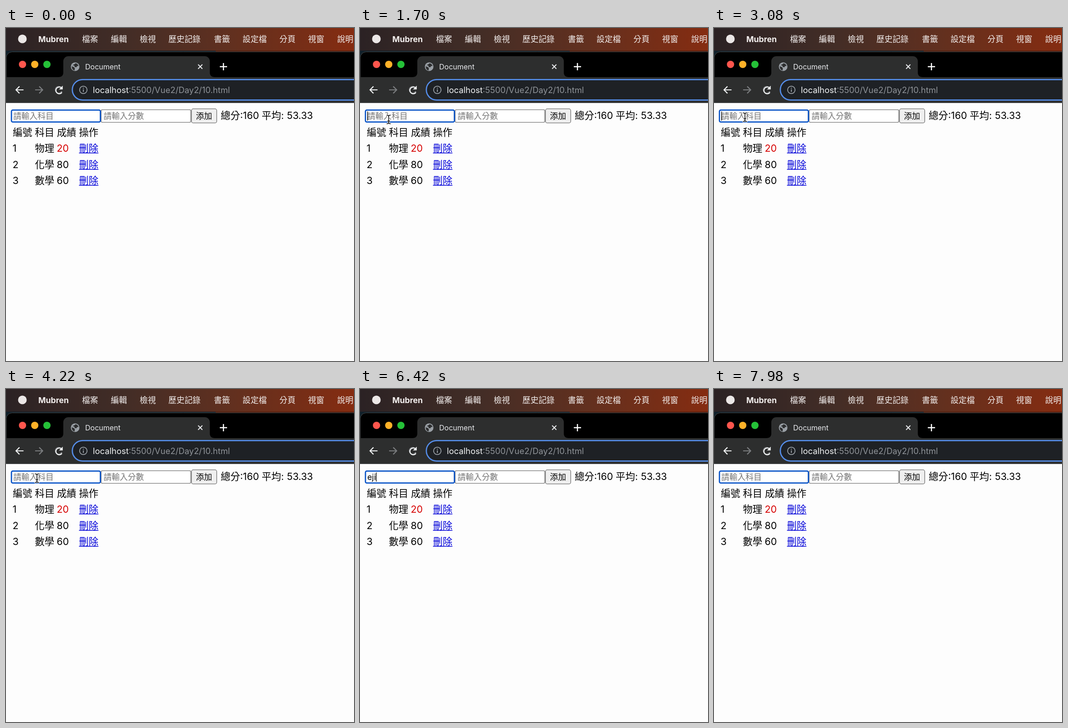
Write an HTML page with a canvas that moves like this. It is 765 px wide and 732 px high and loops after 8000 ms.

```html
<!DOCTYPE html>
<html lang="zh-Hant">
<head>
<meta charset="utf-8">
<title>Document</title>
<style>
  html, body { margin: 0; width: 100%; height: 100%; overflow: hidden; background: #fdfdfd; }
  canvas { display: block; width: 765px; height: 732px; }
</style>
</head>
<body>
<canvas id="stage"></canvas>
<script>
const W = 765, H = 732, LOOP = 8000, BLINK = 600;
const canvas = document.getElementById('stage');
const ctx = canvas.getContext('2d');
const dpr = window.devicePixelRatio || 1;
canvas.width = W * dpr;
canvas.height = H * dpr;

const FAMILY = 'Inter, "Noto Sans CJK TC", "Noto Sans CJK", sans-serif';
const PAGE = 21.33, FORM = 17.78;

// [time, field content]
const keys = [[0, ''], [5400, 'e'], [6000, 'ej'], [6250, 'eji'],
              [7000, 'ej'], [7170, 'e'], [7340, '']];
// moments at which the caret becomes solid again
const resets = [-600, 1560, 1850, ...keys.slice(1).map(k => k[0])];
// pointer path: [time, x, y]
const path = [[60, 420, 648], [820, 66, 235], [1500, 63, 201], [1750, 63, 201], [2350, 68, 196]];

function text(str, x, y, size, color, weight = 400) {
  ctx.font = `${weight} ${size}px ${FAMILY}`;
  ctx.fillStyle = color;
  ctx.fillText(str, x, y);
  return ctx.measureText(str).width;
}

function rect(x, y, w, h, color) {
  ctx.fillStyle = color;
  ctx.fillRect(x, y, w, h);
}

function box(x, y, w, h, r, fill, stroke, lw) {
  ctx.beginPath();
  ctx.roundRect(x, y, w, h, r);
  ctx.fillStyle = fill;
  ctx.fill();
  if (!stroke) return;
  ctx.strokeStyle = stroke;
  ctx.lineWidth = lw;
  ctx.stroke();
}

function disc(x, y, r, color) {
  ctx.beginPath();
  ctx.arc(x, y, r, 0, 7);
  ctx.fillStyle = color;
  ctx.fill();
}

function stroke(d, color, lw) {
  ctx.strokeStyle = color;
  ctx.lineWidth = lw;
  ctx.stroke(new Path2D(d));
}

function menuBar() {
  const g = ctx.createLinearGradient(0, 0, W, 0);
  g.addColorStop(0, '#2b2224');
  g.addColorStop(0.35, '#432d26');
  g.addColorStop(0.65, '#62301f');
  g.addColorStop(1, '#852c11');
  rect(0, 0, W, 53, g);
  rect(0, 50, 461, 18, '#10202a');
  rect(461, 50, W - 461, 3, '#4c1d0f');
  disc(36, 24, 9.5, '#ebe7e6');
  text('Mubren', 71, 31, 17.7, '#f4f0ef', 700);
  const items = [['檔案', 167], ['編輯', 230.5], ['檢視', 294], ['歷史記錄', 357], ['書籤', 457],
                 ['設定檔', 520], ['分頁', 601], ['視窗', 664], ['說明', 728]];
  for (const [label, x] of items) text(label, x, 31, 17.7, '#f4f0ef', 500);
}

function globe(x, y) {
  disc(x, y, 9.5, '#9aa0a6');
  ctx.fillStyle = '#2d2e2f';
  ctx.fill(new Path2D(`M${x - 7.5} ${y - 1}l5 2 2 3 -1 4.500q-6 -1.500 -6 -9.500z
    M${x + 1} ${y - 7.5}q5 1 6.500 6l-3 0 -2 3 -3.500 -1 -1 -3 -4 -1q4 -1 7 -4z`));
}

function browser() {
  box(0.5, 52.5, W + 20, 125, 13, '#000', '#4a4d4f', 1);
  rect(0, 108, W, 57, '#2d2e2e');
  box(126, 62, 322, 48, [11, 11, 0, 0], '#2d2e2e');
  ctx.fillStyle = '#2d2e2e';
  ctx.fill(new Path2D('M115 108q11 0 11 -11v11z M459 108q-11 0 -11 -11v11z'));
  rect(0, 164, W, 1.3, '#55585a');

  disc(36.3, 80, 8, '#ff564d');
  disc(63.2, 80, 8, '#ffb128');
  disc(90, 80, 8, '#25c138');

  globe(152, 85);
  text('Document', 174, 90.500, 16, '#e8eaed');
  stroke('M422.300 80.300l9.400 9.400M431.700 80.300l-9.400 9.400', '#e8eaed', 2);
  stroke('M470 85h16M478 77v16', '#fff', 2.5);

  const arrow = 'l-7.600 7.600 7.600 7.600';
  stroke(`M29.600 128.400${arrow}M22.500 136H38.500`, '#f1f3f4', 2.2);
  stroke('M73 128.400l7.600 7.600 -7.600 7.600M64 136H80', '#7c7e80', 2.2);
  ctx.beginPath();
  ctx.arc(115.8, 136, 7.4, 0.35, 5.6);
  ctx.stroke();
  stroke('M123 141.500A7.400 7.400 0 1 1 121.500 131.200', '#f1f3f4', 2.3);
  ctx.fillStyle = '#f1f3f4';
  ctx.fill(new Path2D('M124.700 126.800v8.200h-8.200z'));

  box(145.8, 113.3, W, 45, 22.5, '#1e2125', '#558de8', 2.7);
  ctx.beginPath();
  ctx.arc(170, 136, 8.2, 0, 7);
  ctx.strokeStyle = '#9aa0a6';
  ctx.lineWidth = 1.8;
  ctx.stroke();
  rect(169.1, 135, 1.9, 5.5, '#9aa0a6');
  rect(169.1, 131.3, 1.9, 2, '#9aa0a6');
  const w = text('localhost', 191, 142.5, 18.45, '#f1f3f4');
  text(':5500/Vue2/Day2/10.html', 191 + w, 142.5, 18.45, '#8f9398');
}

function page(value, caret) {
  rect(0, 165, W, H - 165, '#fdfdfd');

  box(209.2, 179.7, 197, 27.6, 2.5, '#fff', '#747474', 1.3);
  box(12, 180.3, 195.5, 26.4, 3, '#fff', '#0b55c8', 2.8);
  let x = 16;
  if (value) x += text(value, 16, 200, FORM, '#000');
  else text('請輸入科目', 16, 200, FORM, '#757575');
  if (caret) rect(x, 183.5, 1.4, 20, '#000');
  text('請輸入分數', 214.5, 200, FORM, '#757575');

  box(407.7, 177.7, 55.6, 31, 4, '#efefef', '#6f6f6f', 1.3);
  text('添加', 417.5, 200, FORM, '#000');
  text('總分:160', 472, 199.5, PAGE, '#000');
  text('平均:', 562, 199.5, PAGE, '#000');
  text('53.33', 617.5, 199.5, PAGE, '#000');

  const cols = [15, 63.5, 112, 160.5];
  ['編號', '科目', '成績', '操作'].forEach((s, i) => text(s, cols[i], 237, PAGE, '#000'));
  [['物理', 20], ['化學', 80], ['數學', 60]].forEach(([name, score], i) => {
    const y = 272 + i * 35.6;
    text(String(i + 1), cols[0] - 0.5, y, PAGE, '#000');
    text(name, cols[1], y, PAGE, '#000');
    text(String(score), cols[2] - 0.5, y, PAGE, score < 60 ? '#d60000' : '#000');
    text('刪除', cols[3], y, PAGE, '#0000d8');
    rect(cols[3], Math.round(y + 2), 42.7, 1.5, '#0000d8');
  });
}

function pointerAt(t) {
  let [, x, y] = path[0];
  for (let i = 1; i < path.length; i++) {
    const [t0, x0, y0] = path[i - 1], [t1, x1, y1] = path[i];
    if (t < t0) break;
    const p = Math.min(1, (t - t0) / (t1 - t0));
    const e = p * p * (3 - 2 * p);
    x = x0 + (x1 - x0) * e;
    y = y0 + (y1 - y0) * e;
  }
  return [x, y];
}

function pointer(t) {
  if (t < path[0][0] || t >= keys[1][0]) return;
  const [x, y] = pointerAt(t);
  ctx.save();
  ctx.translate(x, y);
  ctx.lineJoin = ctx.lineCap = 'round';
  if (y < 246) {
    const beam = 'M-4 -9.500q4 0 4 3v13q0 3 -4 3M4 -9.500q-4 0 -4 3M0 6.500q0 3 4 3M-2.500 3.500h5';
    stroke(beam, '#fff', 3.6);
    stroke(beam, '#000', 1.5);
  } else {
    const shape = new Path2D('M0 0v22l5 -4.800 3.800 8.500 3.600 -1.600 -3.700 -8.300h7z');
    ctx.strokeStyle = '#fff';
    ctx.lineWidth = 3;
    ctx.stroke(shape);
    ctx.fillStyle = '#000';
    ctx.fill(shape);
  }
  ctx.restore();
}

function draw(t) {
  ctx.setTransform(dpr, 0, 0, dpr, 0, 0);
  const value = keys.filter(k => k[0] <= t).pop()[1];
  const since = t - resets.filter(r => r <= t).pop();
  const caret = Math.floor(since / BLINK) % 2 === 0 && t >= 600;
  menuBar();
  browser();
  page(value, caret);
  pointer(t);
}

const start = performance.now();
function tick() {
  draw((performance.now() - start) % LOOP);
  requestAnimationFrame(tick);
}
tick();
</script>
</body>
</html>
```
